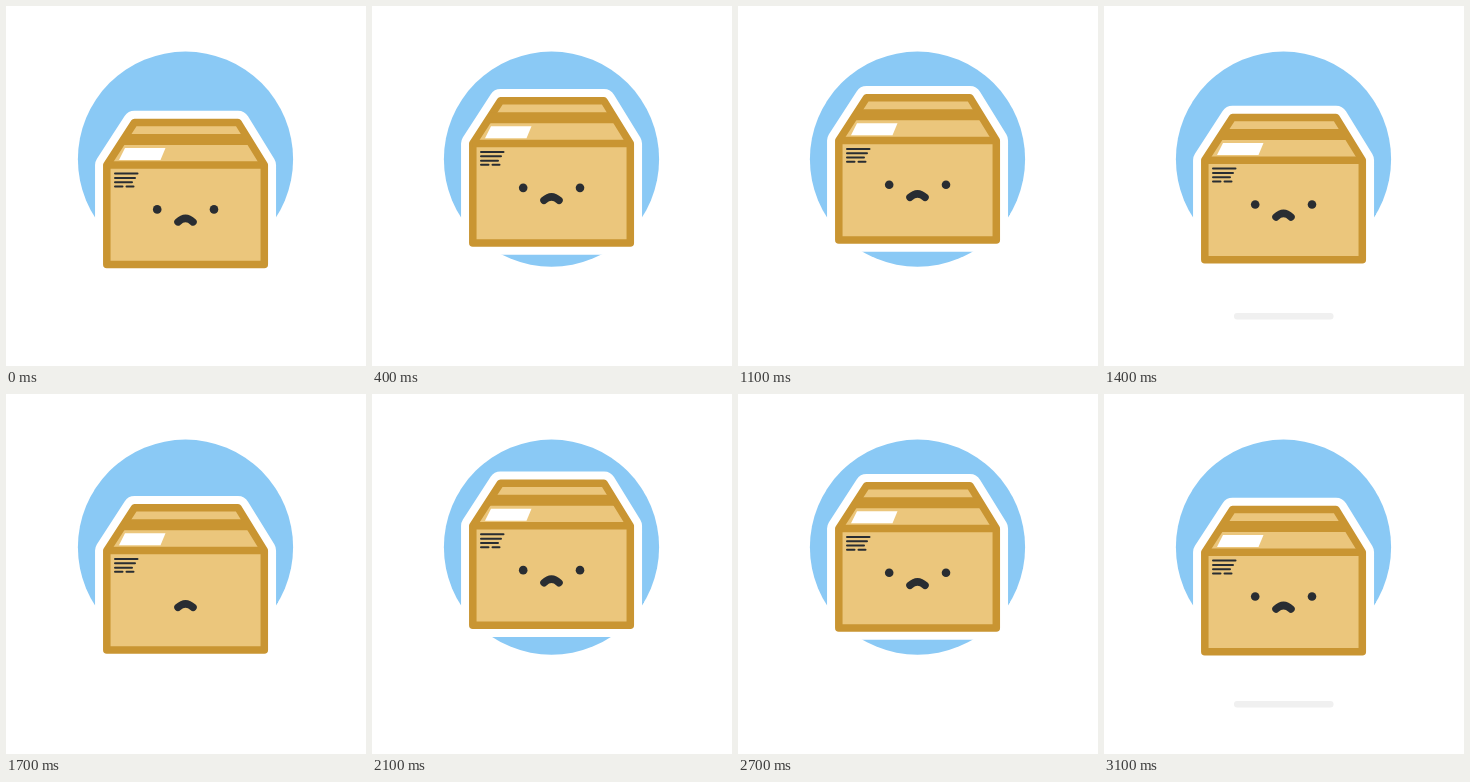
Animation of 360x360 px, one loop 3200 ms. Source, as an HTML page:

```html
<!DOCTYPE html>
<html lang="en">
<head>
<meta charset="utf-8">
<title>Floating box</title>
<style>
  html, body { margin: 0; width: 100%; height: 100%; overflow: hidden; background: #fff; }
  svg { display: block; width: 100vw; height: 100vh; }
  .outline { fill: #fff; stroke: #fff; stroke-width: 23.5; }
  .card { fill: #ebc67c; stroke: #c99532; stroke-width: 7.5; }
  .ink { fill: none; stroke: #292d32; stroke-linecap: round; }
</style>
</head>
<body>
<svg viewBox="0 0 360 360">
  <defs>
    <path id="shape" d="M100.8 159.2 128.5 116.5H232L258.3 159.2V258.7H100.8Z" stroke-linejoin="round"/>
  </defs>
  <circle cx="179.5" cy="153.2" r="107.6" fill="#8ac9f5"/>
  <rect id="shadow" x="130" y="307" width="99.5" height="6.5" rx="3" fill="#f0f0f0"/>
  <g id="box">
    <use href="#shape" class="outline"/>
    <use href="#shape" class="card"/>
    <path d="M117 133.5H243" stroke="#c99532" stroke-width="11"/>
    <path d="M100.8 159.2H258.3" stroke="#c99532" stroke-width="7.5"/>
    <path d="M119 142H159.5L154.5 154H113Z" fill="#fff"/>
    <path class="ink" stroke-width="2" d="M109 167.6H131.5M109 172H129M109 176.3H126M109 180.5H116.5M120.5 180.5H127.5"/>
    <g id="eyes" fill="#292d32">
      <circle cx="151.2" cy="203.5" r="4.3"/>
      <circle cx="208" cy="203.5" r="4.3"/>
    </g>
    <path class="ink" stroke-width="7.5" d="M172 216Q179.5 209 187 216"/>
  </g>
</svg>
<script>
  const LOOP = 3200, BOB = 1600, STEP = 100, EYE_Y = 203.5;
  const [box, eyes, shadow] = ["box", "eyes", "shadow"].map(id => document.getElementById(id));

  // Height above the lowest point, with a slightly widened crest.
  function lift(t) {
    const angle = 2 * Math.PI * (t + 25) / BOB;
    return 17 * (1 - Math.cos(angle)) + 3 * Math.sin(angle) ** 2;
  }

  const eyeScale = t => Math.min(1, Math.abs(t - 1700) / 100);
  const shadowShown = t => (t >= 1400 && t < 1700) || t >= 2900;

  function draw(now) {
    const t = Math.floor((now - start) % LOOP / STEP) * STEP;
    box.setAttribute("transform", `translate(0 ${-lift(t).toFixed(2)})`);
    eyes.setAttribute("transform", `translate(0 ${EYE_Y}) scale(1 ${eyeScale(t)}) translate(0 ${-EYE_Y})`);
    shadow.setAttribute("visibility", shadowShown(t) ? "visible" : "hidden");
  }

  const start = performance.now();
  function tick() {
    draw(performance.now());
    requestAnimationFrame(tick);
  }
  tick();
</script>
</body>
</html>
```
